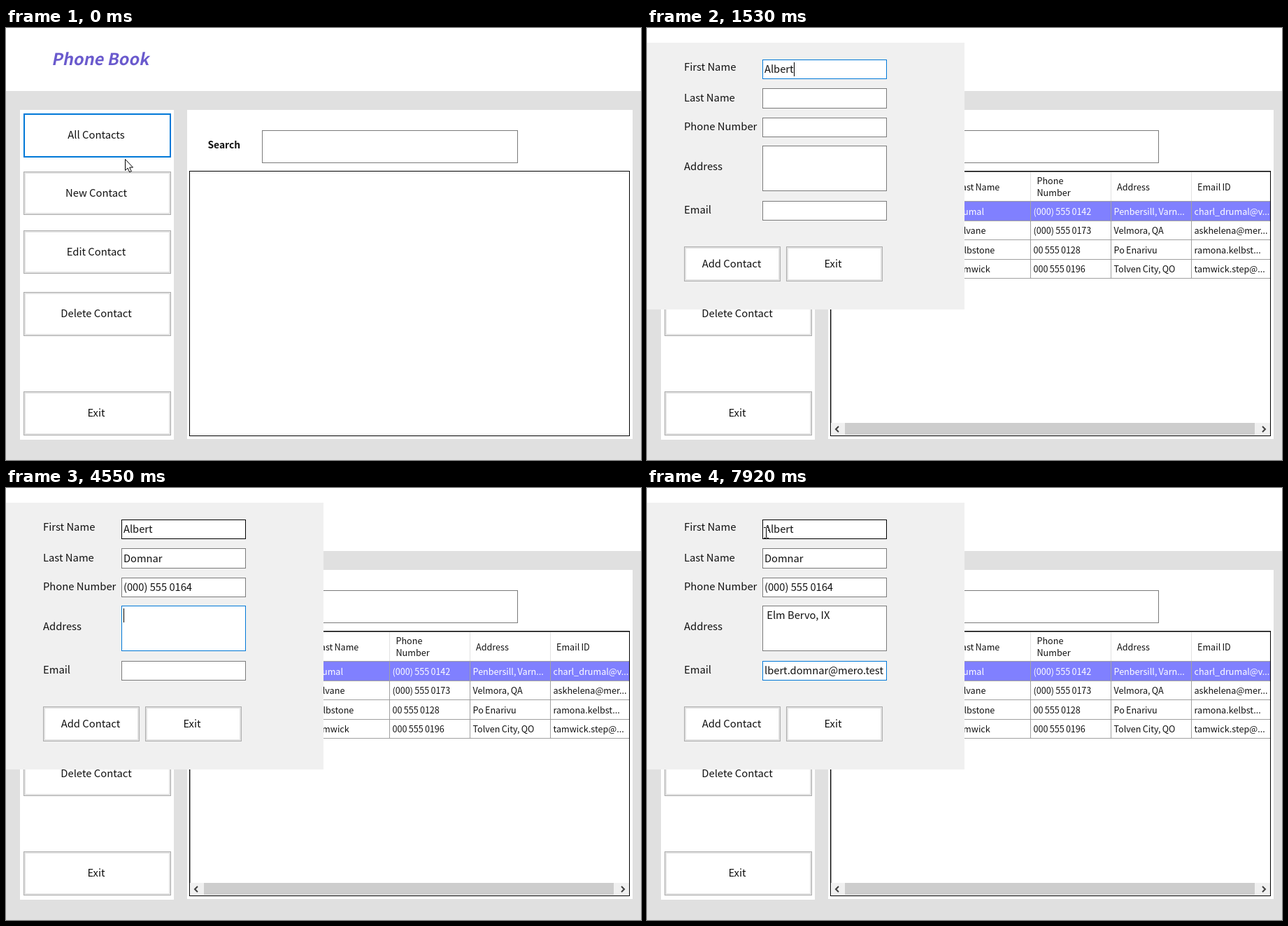
Recreate the animation shown at these times as an HTML page with a canvas. Size 908 px wide and 617 px high, loop 8 s.

```html
<!DOCTYPE html>
<html lang="en">
<head>
<meta charset="utf-8">
<title>Phone Book</title>
<style>
html, body { margin: 0; width: 100%; height: 100%; overflow: hidden; background: #fff; }
canvas { display: block; }
</style>
</head>
<body>
<canvas id="stage" width="908" height="617"></canvas>
<script>
const ctx = document.getElementById('stage').getContext('2d');
const LOOP = 8000;
const FAMILY = '"Noto Sans CJK SC", "Noto Sans CJK JP", "Noto Sans CJK", "Noto Sans", sans-serif';
const BLUE = '#0078d7', GREY = '#7a7a7a', INK = '#111';

const TABLE_AT = 460, DIALOG_AT = 840;

const menu = [
  ['All Contacts', 122, 63], ['New Contact', 205, 62], ['Edit Contact', 289, 62],
  ['Delete Contact', 377, 63], ['Exit', 519, 63]
];

const columns = [320, 435, 549, 664, 779];
const headers = ['First Name', 'Last Name', '', 'Address', 'Email ID'];
const rows = [
  ['Charlotte', 'Drumal', '(000) 555 0142', 'Penbersill, Varn...', 'charl_drumal@v...'],
  ['Helena', 'Tolvane', '(000) 555 0173', 'Velmora, QA', 'askhelena@mer...'],
  ['Ramona', 'Kelbstone', '00 555 0128', 'Po Enarivu', 'ramona.kelbst...'],
  ['Stephen', 'Tamwick', '000 555 0196', 'Tolven City, QO', 'tamwick.step@...']
];

// keys: bursts of [first key time, last key time, key count]
const fields = [
  { label: 'First Name', labelY: 61, y: 45, h: 28, base: 64, text: 'Albert',
    from: 910, to: 1680, keys: [[1150, 1530, 6]] },
  { label: 'Last Name', labelY: 105, y: 86, h: 29, base: 106, text: 'Domnar',
    from: 1760, to: 2440, keys: [[1910, 2290, 6]] },
  { label: 'Phone Number', labelY: 146, y: 128, h: 28, base: 147, text: '(000) 555 0164',
    from: 2440, to: 4480, keys: [[2690, 2690, 1], [2990, 3140, 3], [3310, 3310, 1],
      [3480, 3630, 3], [3790, 3940, 2], [4090, 4320, 4]] },
  { label: 'Address', labelY: 203, y: 168, h: 65, base: 187, text: ' Elm Bervo, IX',
    from: 4480, to: 5580, keys: [[4560, 5420, 14]] },
  { label: 'Email', labelY: 265, y: 247, h: 28, base: 266, text: 'albert.domnar@mero.test',
    from: 5580, to: LOOP, keys: [[5740, 5740, 1], [5820, 6070, 4], [6240, 6390, 3],
      [6470, 6790, 5], [6960, 7360, 6], [7530, 7760, 4]] }
];

function fill(x, y, w, h, color) {
  ctx.fillStyle = color;
  ctx.fillRect(x, y, w, h);
}

function frame(x, y, w, h, color, line = 1) {
  ctx.strokeStyle = color;
  ctx.lineWidth = line;
  ctx.strokeRect(x + line / 2, y + line / 2, w - line, h - line);
}

function write(text, x, y, size, color = INK, align = 'left', style = '') {
  ctx.font = `${style} ${size}px ${FAMILY}`;
  ctx.textAlign = align;
  ctx.fillStyle = color;
  ctx.fillText(text, x, y);
}

function button(text, x, y, w, h, textX, state) {
  fill(x, y, w, h, '#fff');
  if (state === 'hover') {
    frame(x, y, w, h, BLUE);
  } else if (state === 'focus') {
    frame(x, y, w, h, BLUE, 2);
  } else {
    frame(x, y, w, h, '#adadad');
    frame(x + 1, y + 1, w - 2, h - 2, '#e1e1e1', 2);
  }
  write(text, textX, Math.round(y + h / 2 + 4.6), 14.8, INK, 'center');
}

function pointerAt(t) {
  const step = Math.floor(t / 76) * 76;
  const ease = (a, b) => {
    const p = Math.min(1, Math.max(0, (step - a) / (b - a)));
    return p * p * (3 - 2 * p);
  };
  const rise = ease(0, 380), fall = ease(532, 760);
  return { x: 170 - 19 * rise - 20 * fall, y: 187 - 28 * rise + 83 * fall };
}

function drawArrow(p) {
  const shape = [[0, 0], [0, 16], [3.6, 12.6], [6.2, 18.4], [8.8, 17.2], [6.2, 11.6], [11, 11.6]];
  ctx.beginPath();
  for (const [x, y] of shape) ctx.lineTo(Math.round(p.x) + x + 0.5, Math.round(p.y) + y + 0.5);
  ctx.closePath();
  ctx.fillStyle = '#fff';
  ctx.fill();
  ctx.strokeStyle = '#000';
  ctx.lineWidth = 1;
  ctx.stroke();
}

function drawBeam(x, y) {
  fill(x - 2, y, 5, 16, '#fff');
  fill(x, y + 1, 1, 14, '#000');
  for (const dy of [0, 15]) {
    fill(x - 3, y + dy, 3, 1, '#000');
    fill(x + 1, y + dy, 3, 1, '#000');
  }
}

function drawChevron(x, y, dir) {
  ctx.beginPath();
  ctx.moveTo(x - 2 * dir, y - 4);
  ctx.lineTo(x + 2 * dir, y);
  ctx.lineTo(x - 2 * dir, y + 4);
  ctx.strokeStyle = '#404040';
  ctx.lineWidth = 2;
  ctx.stroke();
}

function drawTable() {
  const size = 12.6;
  const rowY = i => Math.round(248 + i * 27.6);
  fill(263, 205, 628, 1, '#777');
  fill(263, 205, 1, 359, '#a0a0a0');
  fill(265, 248, 54, 27, '#b9dbf3');
  fill(320, 248, 571, 27, '#8080ff');

  for (let i = 0; i <= 4; i++) {
    const y = rowY(i) - 1;
    fill(264, y, 56, 1, '#e2e2e2');
    fill(320, y, 571, 1, '#a0a0a0');
  }
  columns.forEach((x, i) => {
    fill(x - 1, 206, 1, 41, i ? '#e2e2e2' : '#a0a0a0');
    fill(x - 1, 247, 1, 111, '#a0a0a0');
  });

  ctx.wordSpacing = '-0.6px';
  headers.forEach((text, i) => write(text, columns[i] + 8, 232, size));
  write('Phone', 557.5, 223, size);
  write('Number', 557.5, 240, size);
  rows.forEach((row, r) => row.forEach((text, i) =>
    write(text, columns[i] + 3.5, Math.round(266.6 + r * 27.5), size, r ? INK : '#fff')));
  ctx.wordSpacing = '0px';

  fill(264, 564, 627, 18, '#f0f0f0');
  fill(283, 564, 586, 17, '#cdcdcd');
  drawChevron(272, 573, -1);
  drawChevron(882, 573, 1);
}

function drawWindow(t, pointer) {
  fill(0, 0, 908, 617, '#fff');
  fill(0, 90, 908, 527, '#e0e0e0');
  fill(20, 117, 220, 471, '#fff');
  fill(259, 117, 637, 470, '#fff');

  ctx.save();
  ctx.transform(1, 0, -0.2, 1, 65, 53);
  write('Phone Book', 0, 0, 23.5, '#6a5acd', 'left', 'bold');
  ctx.restore();

  menu.forEach(([text, y, h], i) => {
    const over = pointer.y >= y && pointer.y < y + h;
    button(text, 25, y, 211, h, 129, over ? 'hover' : i === 0 ? 'focus' : '');
  });

  write('Search', 288.5, 172, 13.8, INK, 'left', 'bold');
  frame(366, 146, 366, 47, GREY);
  if (t >= TABLE_AT) drawTable();
  frame(262, 204, 630, 379, '#000');
}

function typedCount(keys, t) {
  let count = 0;
  for (const [first, last, n] of keys) {
    for (let i = 0; i < n; i++) {
      if (t >= first + (n > 1 ? (last - first) * i / (n - 1) : 0)) count++;
    }
  }
  return count;
}

function drawField(field, index, t) {
  const focused = t >= field.from && t < field.to;
  const left = 168;
  write(field.label, 53, field.labelY, 14.8);
  fill(165, field.y, 178, field.h, '#fff');
  const idle = index === 0 && t >= field.to ? '#000' : GREY;
  frame(165, field.y, 178, field.h, focused ? BLUE : idle);

  let text = field.text.slice(0, typedCount(field.keys, t));
  ctx.font = `14.7px ${FAMILY}`;
  while (ctx.measureText(text).width > 174) text = text.slice(1);
  write(text, left, field.base, 14.7);

  const blinkOff = (t >= 2840 && t < 2990) || t >= 7840;
  if (focused && t >= 990 && !blinkOff) {
    const x = Math.min(340, Math.round(left + ctx.measureText(text).width));
    fill(x, field.base - 15, 1, 20, '#000');
  }
}

function drawDialog(t) {
  fill(0, 21, 454, 381, '#f0f0f0');
  fields.forEach((field, i) => drawField(field, i, t));
  button('Add Contact', 53, 312, 138, 50, 121);
  button('Exit', 199, 312, 138, 50, 266);
}

function draw() {
  const t = performance.now() % LOOP;
  const pointer = pointerAt(t);
  drawWindow(t, pointer);
  if (t >= DIALOG_AT) drawDialog(t);
  if (t < 990) drawArrow(pointer);
  if (t >= 7840) drawBeam(170, 56);
  requestAnimationFrame(draw);
}

draw();
</script>
</body>
</html>
```
